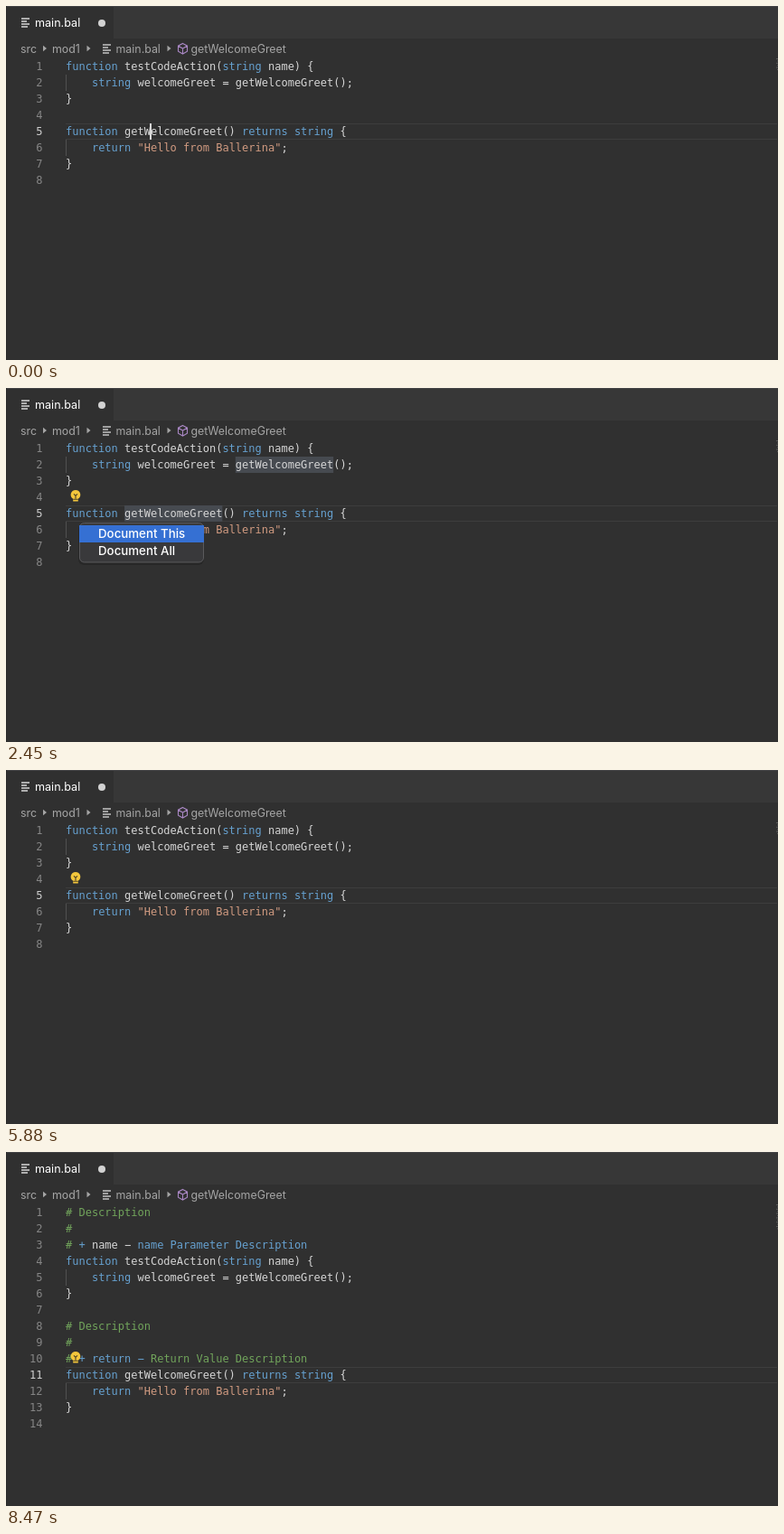
Animation, 854 px wide and 392 px high, one loop 8.54 s. Source, as an HTML page:

```html
<!DOCTYPE html>
<html lang="en">
<head>
<meta charset="utf-8">
<title>Code action: document this / document all</title>
<style>
  html, body { margin: 0; width: 100%; height: 100%; overflow: hidden; background: #303030; }
  svg { display: block; width: 854px; height: 392px; }
  text { white-space: pre; }
  .code text { font: 12px "DejaVu Sans Mono", monospace; fill: #d6d6d6; }
  .code .num { fill: #858585; text-anchor: end; }
  .code .now { fill: #d0d0d0; }
  .key { fill: #66a1d0; }
  .str { fill: #d09a80; }
  .doc { fill: #71a45b; }
  .ui { font: 12.4px Inter, sans-serif; fill: #a5a5a5; }
  .tab { font-size: 12.6px; fill: #fff; }
  .item { font: 500 13.3px Inter, sans-serif; fill: #fff; }
</style>
</head>
<body>
<svg viewBox="0 0 854 392">
  <defs>
    <g id="file" fill="none" stroke-width="1.3">
      <path d="M0 0h9M0 3h6M0 6h9M0 9h7"/>
    </g>
    <path id="arrow" d="M0-3.2L4 0L0 3.2z" fill="#a5a5a5"/>
    <g id="bulb">
      <path d="M-2.8 7V4.2C-7.5 1-5.2-5.6 0-5.6S7.500 1 2.800 4.200V7z" fill="#f3c63c"/>
      <path d="M-2-1.200L0 .8L2-1.200M0 .8V4M-2.800 4.700h5.600" fill="none" stroke="#4a4026" stroke-width="1.100"/>
    </g>
  </defs>
  <rect width="854" height="392" fill="#303030"/>
  <rect x="119" width="735" height="36" fill="#373737"/>
  <rect width="854" height="1" fill="#424244"/>
  <rect width="1" height="392" fill="#2b2b2b"/>
  <use href="#file" x="17" y="14" stroke="#d8d8d8"/>
  <text class="ui tab" x="32" y="23">main.bal</text>
  <circle cx="106" cy="19" r="4" fill="#d2d2d2"/>
  <text class="ui" x="16" y="52">src</text>
  <use href="#arrow" x="41" y="47"/>
  <text class="ui" x="51" y="52">mod1</text>
  <use href="#arrow" x="89.500" y="47"/>
  <use href="#file" x="107" y="43" stroke="#c4c4c4"/>
  <text class="ui" x="121.500" y="52">main.bal</text>
  <use href="#arrow" x="178.500" y="47"/>
  <path d="M195.500 41.500l5 2.700v6l-5 2.800l-5-2.800v-6zM190.500 44.200l5 2.800l5-2.800M195.500 47v6" fill="none" stroke="#a987c4" stroke-width="1.100"/>
  <text class="ui" x="204.500" y="52">getWelcomeGreet</text>
  <g class="code" id="code"></g>
  <g id="menu"></g>
</svg>
<script>
const LOOP = 8540, STEP = 70, LEFT = 66, CHAR = 7.224;
const INSERT_ONE = 2870, UNDO = 4340, INSERT_ALL = 7480;
const rowTop = n => 40 + 18 * n;
const span = (cls, s) => `<tspan class="${cls}">${s}</tspan>`;
const rect = (x, y, w, h, fill, more = "") =>
  `<rect x="${x}" y="${y}" width="${w}" height="${h}" fill="${fill}" ${more}/>`;
const text = (x, y, s, cls = "") => `<text x="${x}" y="${y}" class="${cls}">${s}</text>`;
const paint = s => s.replace(/"[^"]*"|\b(function|string|returns?)\b/g,
  (m, word) => span(word ? "key" : "str", m));

const test = ["function testCodeAction(string name) {",
  "    string welcomeGreet = getWelcomeGreet();", "}"].map(paint);
const greet = ["function getWelcomeGreet() returns string {",
  '    return "Hello from Ballerina";', "}", ""].map(paint);
const docs = last => [span("doc", "# Description"), span("doc", "#"), span("doc", "# ") + last];
const testDocs = docs(span("key", "+ ") + "name − " + span("key", "name Parameter Description"));
const greetDocs = docs(span("key", "+ return − ") + span("doc", "Return Value Description"));

const plain = [...test, "", ...greet];
const one = [...test, "", ...greetDocs, ...greet];
const all = [...testDocs, ...test, "", ...greetDocs, ...greet];

// Blink phases: start of the first "on" half, end of focus
const blinks = [[-220, 1050], [INSERT_ONE, UNDO], [UNDO, 5950], [INSERT_ALL, LOOP]];
const bulbs = [[70, INSERT_ONE], [3710, UNDO], [5180, INSERT_ALL], [8400, LOOP]];
const within = t => ([a, b]) => t >= a && t < b;

function drawCode(t) {
  const lines = t >= INSERT_ALL ? all : t >= INSERT_ONE && t < UNDO ? one : plain;
  const active = lines.length - 3, top = rowTop(active);
  let out = rect(LEFT, top, 787, 1, "#3d3d3d") + rect(LEFT, top + 17, 787, 1, "#3d3d3d");
  if (t >= 70 && t < INSERT_ONE)
    for (const [col, row] of [[26, 2], [9, 5]])
      out += rect(LEFT + col * CHAR, rowTop(row), 15 * CHAR, 18, "#464a50");
  lines.forEach((s, i) => {
    const y = rowTop(i + 1);
    if (s.startsWith("    ")) out += rect(LEFT, y, 1, 18, "#505050");
    out += text(40.5, y + 13, i + 1, i + 1 === active ? "num now" : "num") + text(LEFT, y + 13, s);
  });
  if (bulbs.some(within(t))) out += `<use href="#bulb" x="77" y="${top - 11.5}"/>`;
  const phase = blinks.find(within(t));
  if (phase && (t - phase[0]) % 1000 < 500) out += rect(159, top, 2, 18, "#d8d8d8");
  for (let i = 0; i < lines.length - 2; i++)
    out += rect(852 + i % 2, 58 + 2.4 * i, 2, 1, "#5c5c5c");
  return out;
}

// Popup: open, hover first item, hover second item, start of fade
const popups = [
  { x: 81, open: 1050, first: 1610, second: Infinity, fade: 2520 },
  { x: 75, open: 5950, first: 6300, second: 6580, fade: 7210 }
];

function drawMenu(t) {
  const p = popups.find(p => t >= p.open && t < p.fade + 210);
  if (!p) return "";
  const alpha = 1 - Math.max(0, t - p.fade) / 210;
  const pick = t >= p.second ? 1 : t >= p.first ? 0 : -1;
  let out = rect(p.x - 1, 150, 139, 46, "#000", 'rx="6" opacity=".18"') +
    rect(p.x + .5, 149.5, 137, 43.5, "#39393b", 'rx="5" stroke="#5a5a5c"');
  if (pick >= 0) out += rect(p.x, 152 + 19 * pick, 138, 19, "#3570d3");
  ["Document This", "Document All"].forEach((s, i) =>
    out += text(p.x + 21, 166 + 19 * i, s, "item"));
  return `<g opacity="${alpha}">${out}</g>`;
}

const code = document.getElementById("code"), menu = document.getElementById("menu");
let shown = -1;
function frame() {
  const t = Math.floor(performance.now() % LOOP / STEP) * STEP;
  if (t !== shown) {
    shown = t;
    code.innerHTML = drawCode(t);
    menu.innerHTML = drawMenu(t);
  }
  requestAnimationFrame(frame);
}
frame();
</script>
</body>
</html>
```
